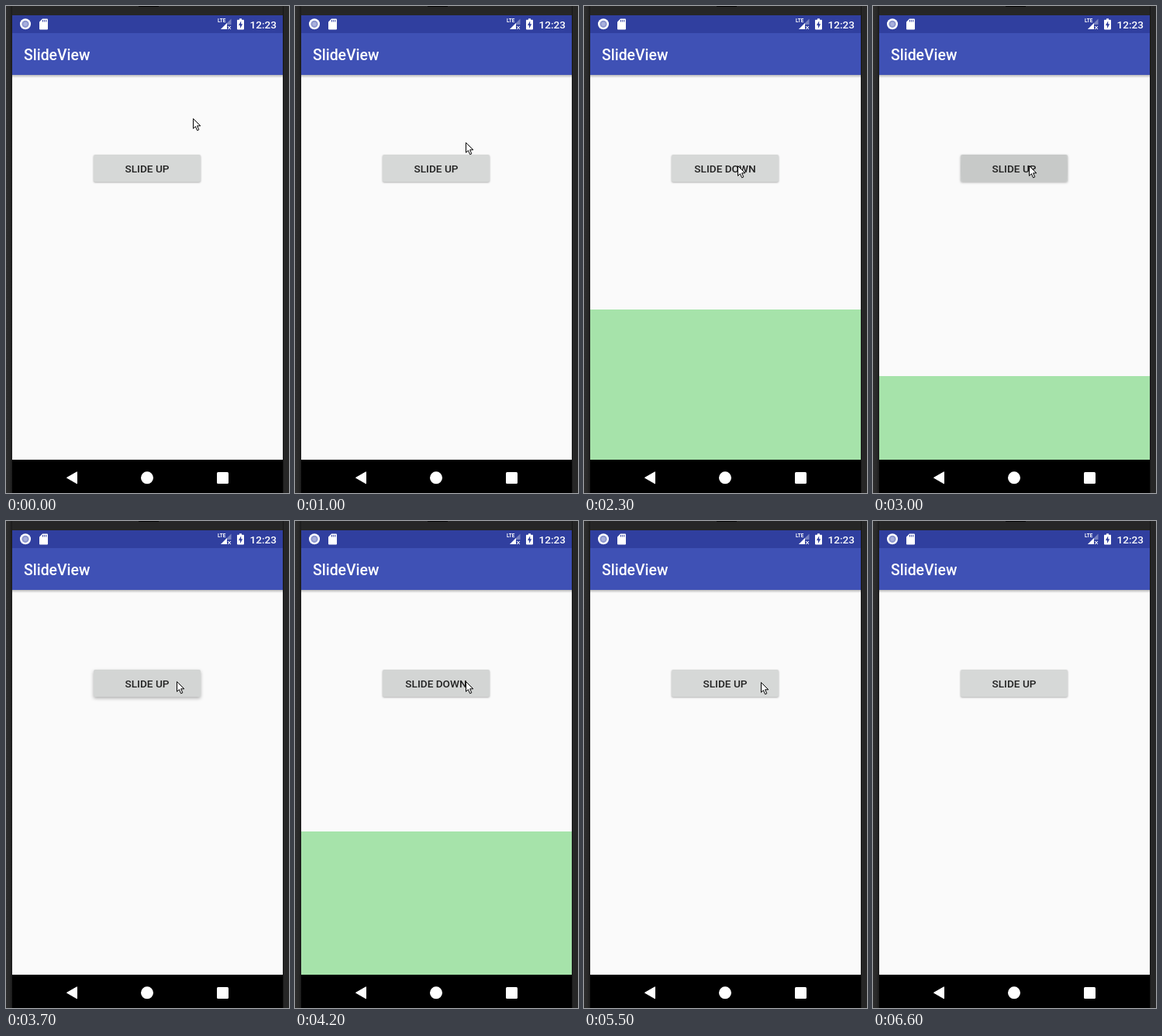
Recreate the animation shown at these times as an HTML page. Size 365 px wide and 629 px high, loop 8100 ms.

```html
<!DOCTYPE html>
<html lang="en">
<head>
<meta charset="utf-8">
<title>Sliding panel</title>
<style>
  html, body { margin: 0; height: 100%; overflow: hidden; background: #262626; }
  svg { display: block; width: 365px; height: 629px; }
  text { font-family: Roboto, sans-serif; font-weight: 500; }
</style>
</head>
<body>
<svg viewBox="0 0 365 629">
  <defs>
    <linearGradient id="bezel">
      <stop offset="0" stop-color="#2d2d2d"/>
      <stop offset=".6" stop-color="#292929"/>
      <stop offset="1" stop-color="#1a1a1a"/>
    </linearGradient>
    <linearGradient id="shade" x2="0" y2="1">
      <stop offset="0" stop-opacity=".26"/>
      <stop offset="1" stop-opacity="0"/>
    </linearGradient>
    <clipPath id="clip"><rect x="113" y="192" width="138" height="35" rx="2"/></clipPath>
  </defs>

  <!-- device -->
  <rect width="365" height="629" fill="#262626"/>
  <rect width="8" height="629" fill="url(#bezel)"/>
  <rect x="357" width="1" height="629" fill="#161616"/>
  <rect x="171" width="26" height="1" fill="#000"/>
  <rect x="8" y="89" width="349" height="497" fill="#fafafa"/>
  <rect x="8" y="89" width="349" height="4" fill="url(#shade)"/>
  <rect x="8" y="12" width="349" height="23" fill="#303f9f"/>
  <rect x="8" y="35" width="349" height="54" fill="#3f51b5"/>
  <text x="23" y="69.5" font-size="19.4" fill="#fff">SlideView</text>

  <!-- status bar -->
  <g fill="#fff">
    <circle cx="25" cy="23.3" r="7"/>
    <circle cx="25" cy="23.3" r="4.6" fill="#8c96cd"/>
    <circle cx="25" cy="23.3" r="2.6" fill="#a9b0dc"/>
    <path d="M47 16.5h6q1 0 1 1v12q0 1-1 1h-9q-1 0-1-1v-9z"/>
    <path d="M47.5 18v2.5m2.2-2.5v2.5m2.2-2.5v2.5" stroke="#303f9f" stroke-width="1"/>
    <text x="273" y="21.2" font-size="6.3" style="font-weight:700">LTE</text>
    <path d="M277 30L290.5 16.5V24H285V30z" opacity=".35"/>
    <path d="M277 30L285 22V30z"/>
    <path d="M286.3 26l3.6 4m0-4l-3.6 4" stroke="#fff" stroke-width="1.1"/>
    <path d="M301 16.3h3v1.4h2q1 0 1 1v10.8q0 1-1 1h-7q-1 0-1-1v-10.8q0-1 1-1h2z"/>
    <path d="M303.2 19.3v4h2l-3.2 5.6v-4h-2z" fill="#303f9f"/>
    <text x="314.5" y="28.6" font-size="13.6">12:23</text>
  </g>

  <!-- button -->
  <rect id="base" x="113" y="192" width="138" height="35" rx="2" fill="#d6d8d7"/>
  <g clip-path="url(#clip)">
    <rect id="tint" x="113" y="192" width="138" height="35"/>
    <circle id="ripple" cy="210"/>
  </g>
  <text id="label" x="182" y="214.6" font-size="13.6" text-anchor="middle" fill="#212121"></text>

  <rect id="panel" x="8" width="349" height="194" fill="#a6e3aa"/>

  <!-- navigation bar -->
  <rect x="8" y="586" width="349" height="43" fill="#000"/>
  <g fill="#fff">
    <path d="M78.5 609.3L91.5 601.8V616.8z" stroke="#fff" stroke-linejoin="round"/>
    <circle cx="182" cy="609.3" r="8"/>
    <rect x="272" y="602" width="15" height="15" rx="1.5"/>
  </g>

  <path id="cursor" d="M.5.5V13.3L3.4 10.6L5.6 15.7L7.8 14.8L5.6 9.8H9.8z" fill="#fff" stroke="#000"/>
</svg>
<script>
const $ = id => document.getElementById(id);
const set = (id, attrs) => { for (const k in attrs) $(id).setAttribute(k, attrs[k]); };
const LOOP = 8100, STEP = 100, SLIDE = 500, DELAY = 68;
const clicks = [1600, 2700, 3700, 4800];

const clamp = x => Math.min(1, Math.max(0, x));
const mix = (a, b, p) => a + (b - a) * p;
const ease = p => (1 - Math.cos(Math.PI * clamp(p))) / 2;

// start, end, x, y of each pointer move
const moves = [
  [700, 1300, 198, 206],
  [2900, 3300, 220, 207],
  [4900, 5400, 228, 208],
  [5900, 6600, 211, -20]
];

function pointer(t) {
  let x = 241, y = 145;
  for (const [from, to, mx, my] of moves) {
    const p = ease((t - from) / (to - from));
    x = mix(x, mx, p);
    y = mix(y, my, p);
  }
  return [Math.round(x), Math.round(y)];
}

function draw(t) {
  // odd clicks raise the panel, even clicks lower it
  let lift = 0, open = false, age = -1;
  clicks.forEach((c, i) => {
    const up = i % 2 ? -1 : 1;
    lift += up * ease((t - c - DELAY) / SLIDE);
    if (t >= c + DELAY) open = up > 0;
    if (t >= c) age = t - c;
  });
  set('panel', { y: Math.round(586 - 194 * lift) });
  $('label').textContent = open ? 'SLIDE DOWN' : 'SLIDE UP';

  const [x, y] = pointer(t);
  set('cursor', { transform: `translate(${x} ${y})` });

  const active = age >= 0 && age < 600;
  const raised = active ? 1 - clamp((age - 100) / 300) : 0;
  const tint = active ? Math.min(.015 + age / 5000, (600 - age) / 6000) : 0;
  set('tint', { opacity: tint });
  set('ripple', {
    cx: mix(x, 182, clamp(age / 260)),
    r: active ? age * .23 : 0,
    opacity: active ? .045 * (1 - clamp((age - 100) / 350)) : 0
  });
  $('base').style.filter =
    `drop-shadow(0 ${1 + raised}px ${1 + raised}px rgba(0,0,0,.3))`;
}

function tick(now) {
  draw(Math.floor(now % LOOP / STEP) * STEP);
  requestAnimationFrame(tick);
}
draw(0);
requestAnimationFrame(tick);
</script>
</body>
</html>
```
